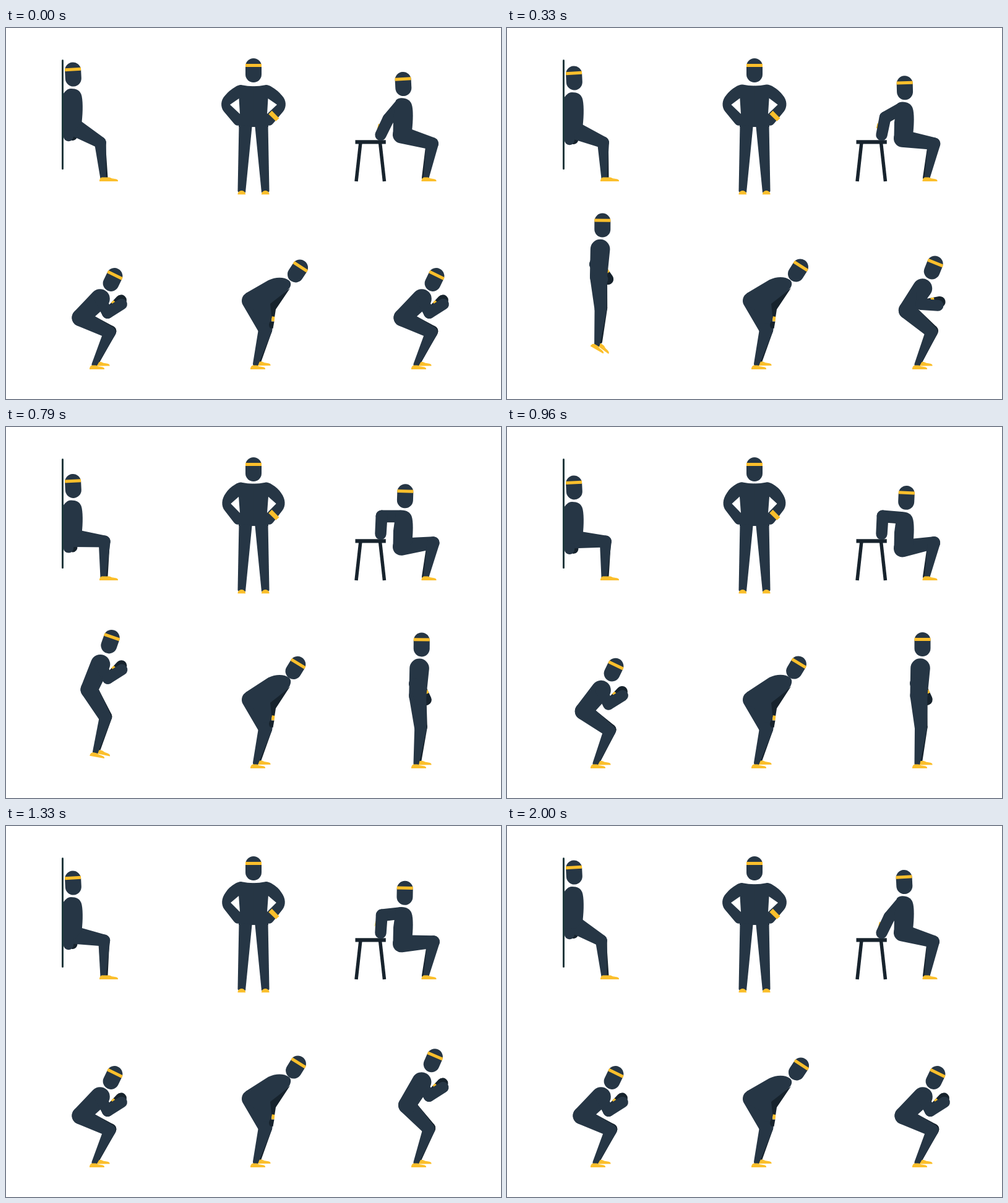
Animation, 800 px wide and 600 px high, one loop 2.04 s. Source, as an HTML page with a canvas:

```html
<!DOCTYPE html>
<html lang="en">
<head>
<meta charset="utf-8">
<title>Workout</title>
<style>
  html, body { margin: 0; width: 100%; height: 100%; overflow: hidden; background: #fff; }
  canvas { display: block; }
</style>
</head>
<body>
<canvas id="stage" width="800" height="600"></canvas>
<script>
const ctx = document.getElementById('stage').getContext('2d');
const BODY = '#263645', SHADE = '#17232d', GOLD = '#fbbf2c', WALL = '#1d383c';
const LOOP = 2040, FRAMES = 49;

const mix = (a, b, k) => a + (b - a) * k;
const smooth = s => s * s * (3 - 2 * s);
const ease = (f, from, to) => smooth(Math.max(0, Math.min(1, (f - from) / (to - from))));

function shape(d, color, rule = 'nonzero') {
  ctx.fillStyle = color;
  ctx.fill(new Path2D(d), rule);
}

function line(x1, y1, x2, y2, width, color, cap = 'butt') {
  ctx.strokeStyle = color;
  ctx.lineWidth = width;
  ctx.lineCap = cap;
  ctx.beginPath();
  ctx.moveTo(x1, y1);
  ctx.lineTo(x2, y2);
  ctx.stroke();
}

// Tapered limb: outline around two circles
function limb([x1, y1], r1, [x2, y2], r2, color = BODY) {
  const d = Math.hypot(x2 - x1, y2 - y1) || 0.01;
  const a = Math.atan2(y2 - y1, x2 - x1);
  const b = Math.acos(Math.max(-1, Math.min(1, (r1 - r2) / d)));
  ctx.fillStyle = color;
  ctx.beginPath();
  ctx.arc(x1, y1, r1, a + b, a - b + 2 * Math.PI);
  ctx.arc(x2, y2, r2, a - b, a + b);
  ctx.fill();
}

// Middle joint of a two-bone chain; side picks the bend direction
function joint([x1, y1], [x2, y2], l1, l2, side) {
  const dx = x2 - x1, dy = y2 - y1, len = Math.hypot(dx, dy);
  const d = Math.min(len, l1 + l2 - 0.1);
  const a = (l1 * l1 - l2 * l2 + d * d) / (2 * d);
  const h = Math.sqrt(Math.max(0, l1 * l1 - a * a)) * side;
  const ux = dx / len, uy = dy / len;
  return [x1 + ux * a + uy * h, y1 + uy * a - ux * h];
}

function polar([x, y], deg, r) {
  const a = deg * Math.PI / 180;
  return [x + r * Math.cos(a), y + r * Math.sin(a)];
}

function at(x, y, deg, draw) {
  ctx.save();
  ctx.translate(x, y);
  ctx.rotate(deg * Math.PI / 180);
  draw();
  ctx.restore();
}

function head(x, y, deg) {
  at(x, y, deg, () => {
    limb([0, -6.5], 13, [0, 6.5], 13);
    ctx.fillStyle = GOLD;
    ctx.fillRect(-13, -10.5, 26, 5);
  });
}

function shoe(x, y, deg = 0) {
  at(x, y, deg, () =>
    shape('M-8 8C-8 4-6 1.5-3 1.5H2C4 1.8 5 3.2 8 3.6C12 4 16 5 16 7V8Z', GOLD));
}

function wallSit(u) {
  const d = 23 * u;
  const hip = [108, 159 + d], ankle = [157, 243];
  const knee = joint(hip, ankle, 51.5, 58, 1);
  ctx.save();
  ctx.beginPath();
  ctx.rect(92.5, 0, 200, 300);
  ctx.clip();
  limb([knee[0] + 0.5, knee[1] + 2], 8, [160.5, 242], 4, SHADE);
  limb([105, 150 + d], 8, [107.5, 174 + d], 8, SHADE);
  shoe(165, 240);
  limb(hip, 14.5, knee, 9.5);
  limb(knee, 9.5, ankle, 4.5);
  shoe(159, 240);
  limb([102, 112 + d], 9, [101, 175 + d], 8.2);
  ctx.translate(0, d);
  shape('M92 165V107C95 104 98 98 105 98C114 98 119 101 121.5 107C124.5 115 124.5 135 122.5 152L112 166Z', BODY);
  ctx.restore();
  head(108.5, 75 + d, -3);
  line(91.5, 52.5, 91.5, 227.5, 3, WALL, 'round');
}

// One half of the front view, mirrored for the other side
function standing(u) {
  const y = 92.3 - 2.8 * u, e = 1.5 * u;
  for (const side of [-1, 1]) {
    ctx.save();
    ctx.translate(400, 0);
    ctx.scale(side, 1);
    shape(`M-0.5 ${y + 2}Q10 ${y + 2} 19 ${y}C22 ${y - 0.8} 26 ${y + 1} 29 ${y + 2.6}
      Q40 ${y + 9} ${46 - e} ${y + 17}C${53.5 - e} 117 ${53.5 - e} 128 ${48 - e} 135
      L32 154C29 158 26 158 24 157.5V160H-0.5Z
      M${38 - e} 124L${23.5 + e / 3} ${114 - e}L22 139Z`, BODY, 'evenodd');
    shape('M23.5 157L25.5 263Q25.5 266 22.5 266H13L2.3 158Z', BODY);
    shape('M12.9 269.3C12.9 261 25.5 261 25.5 269.3Z', GOLD);
    if (side > 0) shape('M24.3 139.3L29.7 133.7L41.6 146L36.2 150.8Z', GOLD);
    ctx.restore();
  }
  head(400, 68.5, 0);
}

function chairDip(u) {
  line(573, 185, 566, 248, 5.5, SHADE);
  line(604.5, 185, 611.5, 248, 5.5, SHADE);
  ctx.fillStyle = SHADE;
  ctx.fillRect(564.5, 181.3, 49.3, 6.2);

  const d = 24 * u;
  const hip = [639, 172.5 + d], ankle = [679, 242];
  const knee = joint(hip, ankle, 52, 56, 1);
  const sh = [637.5 - 0.5 * u, 124 + 22.5 * u], hand = [605.5, 173];
  const elbow = joint(sh, hand, 30, 29, -1);

  limb([knee[0] - 1.5, knee[1] + 2], 9, [676, 242], 4, SHADE);
  limb(hip, 14, knee, 10);
  limb(knee, 10, ankle, 4.5);
  shoe(679.5, 240);

  limb([sh[0], sh[1] + 1.2], 9, [elbow[0], elbow[1] + 1.2], 9, SHADE);
  const mx = mix(elbow[0], hand[0], 0.48), my = mix(elbow[1], hand[1], 0.48);
  if (u < 0.8) line(mx - 8.8, my - 4, mx - 10.6, my + 4, 3 * (1 - u), GOLD);
  limb(sh, 9.5, elbow, 9.5);
  limb(elbow, 9.5, hand, 9.2);

  ctx.save();
  ctx.translate(0, d);
  shape('M630 117C633 114 636 113.3 639 113.3C648 113.5 653 117 655.5 123C658.5 131 658 150 656 167L640 180L625.5 171L626 146Z', BODY);
  ctx.restore();
  head(642 + 3.5 * u, 90.5 + 24 * u, -3 + 5.5 * u);
}

function bend(u) {
  const y = -3 * u;
  const hip = [395, 441], knee = [419, 488], ankle = [403.5, 543];
  limb([421, 487], 9.5, [408, 540], 4, SHADE);
  shoe(411.5, 538);
  shape(`M459 ${421 + y * 0.5}L436 455L434 468L428 470L424 446Z`, SHADE);
  limb(hip, 14, knee, 11);
  limb(knee, 11, ankle, 4.5);
  shoe(403, 544);
  shape(`M387.5 429L424 ${408 + y}C436 ${402 + y} 450 ${402.5 + y} 457 ${408 + y}
    C461 ${411 + y} 461 ${416 + y} 458.5 ${420 + y * 0.5}
    Q456 ${424 + y * 0.5} 450 428L427 446L429.5 470L428 482L408 460L390 450Z`, BODY);
  shape('M427 474.5L433.5 474.5L431.5 486L427 485.5Q423 480 427 474.5Z', SHADE);
  shape('M429.8 466.3L434.3 467L433.6 474.5L429 474Z', GOLD);
  head(471.5 - 4 * u, 393 - 4 * u, 33 - 2 * u);
}

// crouch, lean and guard run from 0 (upright, arms down) to 1 (full squat, fists up)
function squatter(x, { crouch, lean, guard, lift = 0 }) {
  const hip = [mix(145.5, 120.5, (crouch + lean) / 2), mix(434.5, 468.5, crouch)];
  const sh = [mix(148, 152, lean), mix(390, 438, crouch)];
  const ankle = [143, 544];
  const knee = joint(hip, ankle, 52.7, 57.2, 1);
  const farKnee = [knee[0] + 1.8, knee[1] - 2];
  const aim = mix(88, 14, guard), drop = (1 - guard) ** 3;
  const hand = polar(sh, aim, 36 + 14 * drop);
  const far = polar(sh, aim - 10, 34 + 18 * drop);
  const elbow = joint(sh, hand, 26, 27, -1);
  const farElbow = joint(sh, far, 26, 27, -1);
  const pitch = Math.min(32, lift * lift / 35);

  ctx.save();
  ctx.translate(x + lift * 0.08, -lift);
  limb([hip[0] + 2, hip[1]], 12, farKnee, 9, SHADE);
  limb(farKnee, 9, [147.5, 539], 4, SHADE);
  at(...ankle, pitch, () => shoe(8.5, -5.5, pitch * 0.2));

  limb(farElbow, 8, far, 9, SHADE);
  const turn = Math.atan2(far[1] - farElbow[1], far[0] - farElbow[0]) * 180 / Math.PI;
  at(...far, turn, () => {
    ctx.fillStyle = GOLD;
    ctx.fillRect(-14, -8.7, 5.5, 17.4);
  });

  limb(hip, 14, knee, 9.8);
  limb(knee, 9.8, ankle, 4.5);
  shoe(...ankle, pitch);
  limb(hip, 14, sh, 15.8);
  limb(sh, 9, elbow, 9);
  limb(elbow, 9, hand, 9);
  head(mix(151.5, 172.5, lean), mix(351.5, 407, crouch), 26 * lean);
  ctx.restore();
}

const squat = f => ({
  crouch: 1 - ease(f, 0, 20) + ease(f, 24, 40),
  lean: 1 - ease(f, 4, 20) + ease(f, 24, 34),
  guard: 1 - ease(f, 0, 17) + ease(f, 24, 32)
});

const jump = f => ({
  crouch: 1 - ease(f, 0, 7) + ease(f, 15, 27),
  lean: 1 - ease(f, 0, 8.5) + ease(f, 13, 22),
  guard: 1 - ease(f, 0, 9) + ease(f, 11, 19),
  lift: 45 * Math.max(0, 1 - ((f - 12.5) / 8.5) ** 2)
});

function render(ms) {
  // 24 steps per second
  const f = Math.min(FRAMES - 1, Math.floor((ms % LOOP + 5) / (LOOP / FRAMES)));
  const u = smooth(1 - Math.abs(f / 24 - 1));
  ctx.fillStyle = '#fff';
  ctx.fillRect(0, 0, 800, 600);
  wallSit(u);
  standing(u);
  chairDip(u);
  squatter(0, jump(f));
  bend(u);
  squatter(520, squat(f));
}

const start = performance.now();
function tick(now) {
  render(Math.max(0, now - start));
  requestAnimationFrame(tick);
}
render(0);
requestAnimationFrame(tick);
</script>
</body>
</html>
```
